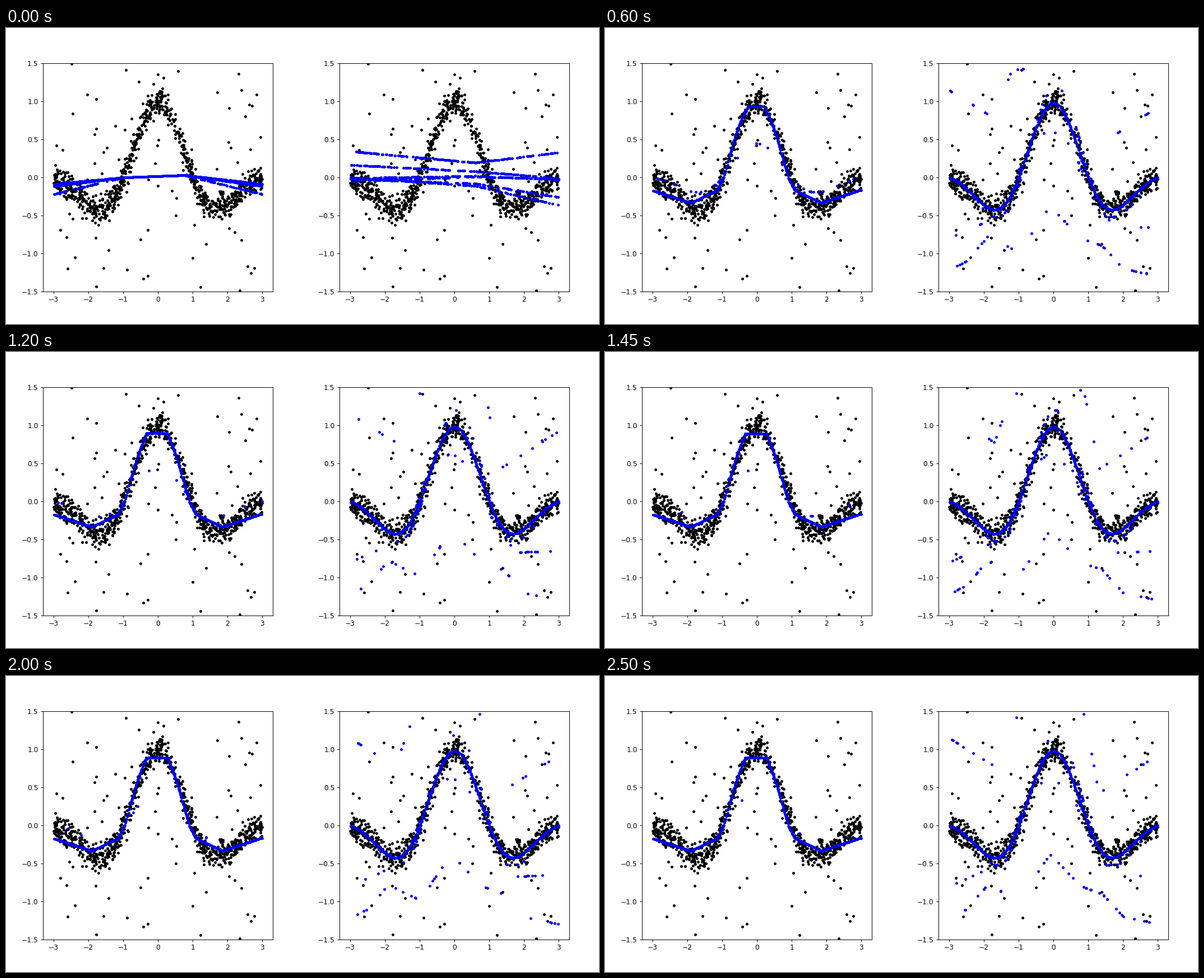
These frames come from a looping animation (1058x529 px, 2.55 s). A matplotlib script:

```python
import matplotlib.pyplot as plt
import numpy as np
from matplotlib.animation import FuncAnimation

FRAMES, INTERVAL = 51, 50
SETTLED = 12
COUNT = 850

rng = np.random.default_rng(7)
x = np.sort(rng.uniform(-3, 3, COUNT))


def signal(t):
    return np.exp(-t**2 / 4) * np.cos(np.pi * t / 2)


def noisy_data(inliers=850, outliers=90):
    data_x = rng.uniform(-3, 3, inliers + outliers)
    data_y = .97 * signal(data_x) + rng.normal(0, .09, data_x.size)
    data_y[inliers:] = rng.uniform(-1.5, 1.5, outliers)
    return data_x, data_y


def curve(*knots, at=x):
    """Piecewise linear curve through the knots."""
    return np.interp(at, *zip(*knots))


def mix(a, b, t):
    return a + (b - a) * t


def learned(n):
    return min(1, (1 - np.exp(-n / 2.5)) / (1 - np.exp(-SETTLED / 2.5)))


def pick(branches, shares, seed):
    """Choose one branch for every x with the given shares."""
    edges = np.cumsum(shares / shares.sum(axis=0), axis=0)
    u = np.random.default_rng(seed).random(COUNT)
    index = np.minimum((u > edges).sum(axis=0), len(branches) - 1)
    return branches[index, np.arange(COUNT)]


# Left panel: two branches join the flat-topped fit, a third dies out
left_start = np.array([curve((-3, -d), (-1, 0), (.75, .03), (3, -d))
                       for d in (.085, .115, .22)])


def flat_top(n):
    soft = np.exp(-max(0, n - SETTLED) / 4)
    return curve((.3 - .08 * soft, .895 + .04 * soft), (.42, .76), (.6, .53),
                 (.93, 0), (1.12, -.17), (1.87, -.335), (3, -.165),
                 at=abs(x + .03))


def left_points(n):
    t = learned(n)
    fit = flat_top(n)
    branches = mix(left_start, np.array([fit, fit, .45 * signal(x)]), t)
    stray = .03 * np.exp(-max(0, n - SETTLED) / 14)
    shares = mix(np.array([.4, .4, .2]), np.array([.8, .2, stray]), t)
    return pick(branches, shares[:, None] * np.ones(COUNT), 100 + n)


# Right panel: upper, near upper, lower, near lower and two main branches
hinges = [(.345, .195, .33), (.165, .08, -.01), (0, -.11, -.365),
          (-.02, -.08, -.26), (-.01, .02, -.03), (-.05, .01, -.02)]
right_start = np.array([curve(*zip((-3, .6, 3), ys)) for ys in hinges])
main = .98 * signal(x)
upper = curve((-3, 1.15), (-1.7, .78), (-1.2, 1.42), (.87, 1.47), (1.3, .43),
              (3, .93))
lower = curve((-3, -1.22), (-2.5, -1.1), (-1.9, -.78), (-1, -.98), (-.1, -.38),
              (.8, -.8), (1.4, -.9), (2, -1.2), (3, -1.3))
near_lower = curve((-3, -.8), (-1.4, -.47), (-.75, .42), (-.1, .65), (.55, .4),
                   (1.05, -.2), (1.75, -.67), (3, -.65))
right_end = np.array([upper, 1.2 * signal(x - .06), lower, near_lower,
                      main, main])

right_shares = np.outer([.025, .035, .03, .025, .6, .3], np.ones(COUNT))
right_shares[0, (x > -.85) & (x < .7)] = 0
steep = (abs(x) > .65) & (abs(x) < 1.25)
right_shares[1:4:2, steep] *= 3


def right_points(n):
    t = learned(n)
    shares = mix(1 / 6, right_shares, t)
    return pick(mix(right_start, right_end, t), shares, 300 + n)


fig, axes = plt.subplots(1, 2, figsize=(12, 6), dpi=1058 / 12)
fig.subplots_adjust(left=.0625, right=.95, bottom=.11, top=.88, wspace=.2903)
data = noisy_data()
fits = []
for ax in axes:
    ax.plot(*data, "k.")
    fits += ax.plot([], [], "b.")
    ax.set(xlim=(-3.3, 3.3), ylim=(-1.5, 1.5), xticks=range(-3, 4))


def update(n):
    fits[0].set_data(x, left_points(n))
    fits[1].set_data(x, right_points(n))
    return fits


animation = FuncAnimation(fig, update, frames=FRAMES, interval=INTERVAL,
                          repeat=True, repeat_delay=0)
plt.show()
```
